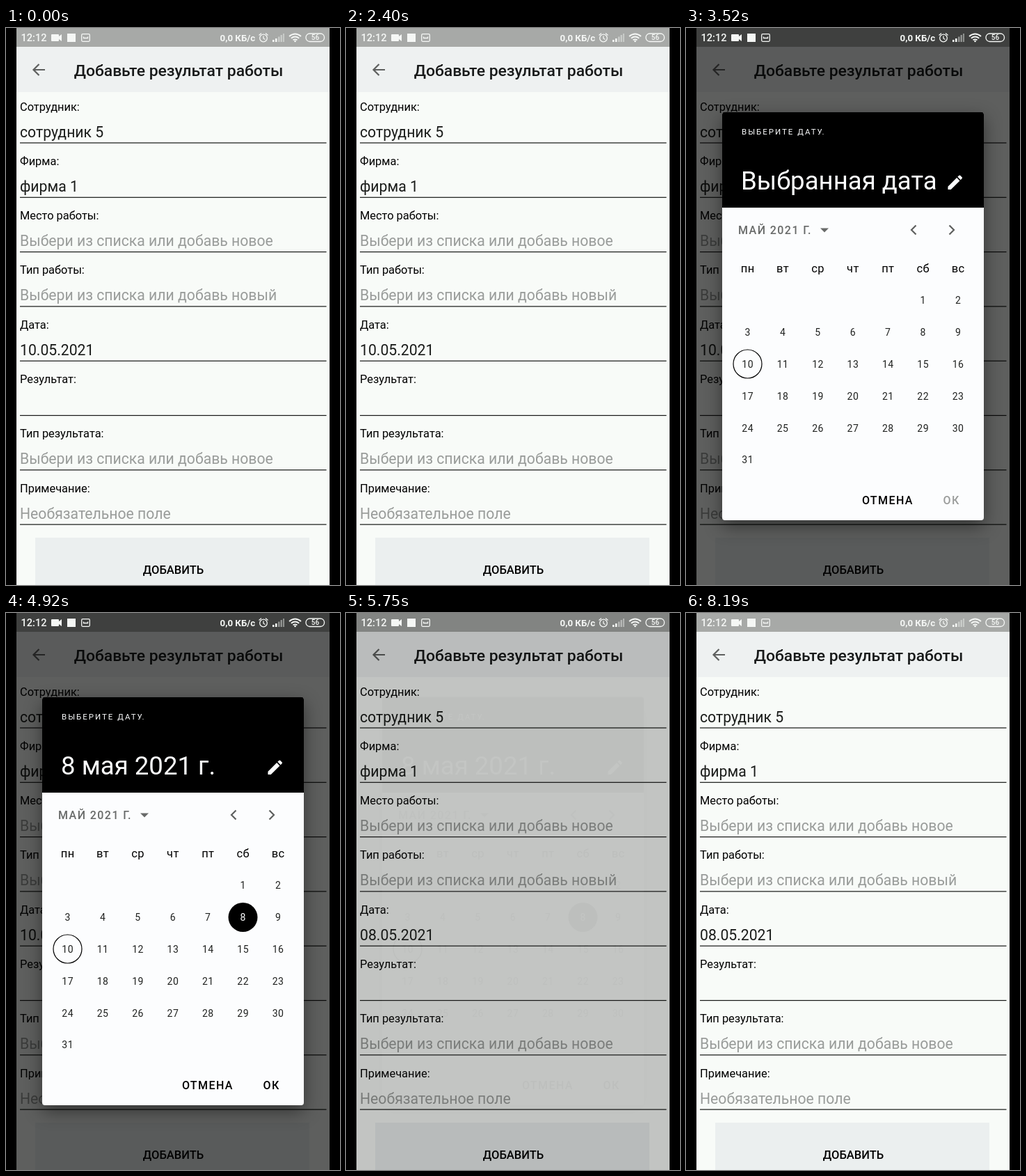
These frames come from a looping animation (480x800 px, 8.23 s). An HTML page:

```html
<!DOCTYPE html>
<html lang="ru">
<head>
<meta charset="utf-8">
<style>
  html, body { margin: 0; height: 100%; overflow: hidden; background: #000; }
  svg { display: block; width: 480px; height: 800px; font-family: Roboto, sans-serif; }
  .medium { font-weight: 500; }
  .mid { text-anchor: middle; }
  .label { font-size: 16.4px; }
  .value { font-size: 21.2px; fill: #1a1c1a; }
  .hint { fill: #999c9a; }
  .caps { font-size: 16px; font-weight: 500; letter-spacing: 1.43px; }
  .line { fill: none; stroke: #5e605f; stroke-width: 2.2; }
  #shadow { filter: drop-shadow(0 9px 13px rgba(0, 0, 0, .45)); }
</style>
</head>
<body>
<svg viewBox="0 0 480 800">
  <rect width="480" height="800"/>
  <rect x="15" width="450" height="800" fill="#f8fbf8"/>
  <rect x="15" width="450" height="27" fill="#a7a9a7"/>
  <rect x="15" y="27" width="450" height="65" fill="#eef1f1"/>
  <path class="line" d="M56 60H40M47.5 52l-8 8 8 8"/>
  <text class="medium mid" x="248" y="69" font-size="22.9" fill="#181a1a">Добавьте результат работы</text>
  <g id="form"></g>
  <rect x="42" y="732" width="394" height="68" fill="#ebefef"/>
  <text class="medium mid" x="240.5" y="784" font-size="16.5">ДОБАВИТЬ</text>
  <rect id="dim" x="15" width="450" height="800"/>

  <g fill="#f5f7f5">
    <text class="medium" x="21.5" y="18.7" font-size="14.6">12:12</text>
    <path d="M66 9h9q1 0 1 1v2l4-3v10l-4-3v2q0 1-1 1h-9q-1 0-1-1v-8q0-1 1-1z"/>
    <rect x="88" y="8" width="12" height="12"/>
    <g fill="none" stroke="#f5f7f5" stroke-width="1.3">
      <rect x="108.7" y="8.7" width="11.6" height="10.6" rx="1.5"/>
      <path d="M111 14.5h7M111.5 12.5v2M117.5 12.5v2"/>
      <circle cx="370" cy="14.5" r="5.3"/>
      <path d="M370 11.5v3.5l2.5 1.5M363.5 10.5l3.500-3M376.5 10.5l-3.5-3"/>
      <rect x="431" y="8" width="26.5" height="11.5" rx="5.5"/>
      <path stroke-width="1.8" d="M407 12q8.5-7 17 0M409.8 14.8q5.7-4.5 11.4 0M412.5 17.3q3-2 6 0"/>
    </g>
    <path d="M383 17h2.5v3h-2.5zM387 15h2.5v5h-2.5z"/>
    <path opacity=".45" d="M391 12.5h2.5v7.5h-2.5zM394.5 10h2.5v10h-2.5zM398 8h2v12h-2z"/>
    <circle cx="415.5" cy="19" r="1.3"/>
    <text x="307.5" y="18.5" font-size="13.3" font-weight="700">0,0 КБ/с</text>
    <text class="mid medium" x="444.5" y="17.3" font-size="10">56</text>
  </g>

  <g id="dialog">
    <rect id="shadow" x="52" y="120.5" width="376" height="586.5" rx="4" fill="#fcfdfe"/>
    <path d="M52 258V124.5q0-4 4-4H424q4 0 4 4V258z"/>
    <g fill="#fcfdfe">
      <text x="80" y="152.5" font-size="11.46" letter-spacing="2">ВЫБЕРИТЕ ДАТУ.</text>
      <text id="headline" x="79" y="231.5" font-size="36.6"></text>
      <path transform="translate(373 208) scale(1.146)" d="M3 17.25V21h3.75L17.81 9.94l-3.75-3.75zM20.71 7.04q.6-.7 0-1.41l-2.34-2.34q-.7-.6-1.41 0l-1.83 1.83 3.75 3.75z"/>
    </g>
    <text class="caps" x="75" y="296" fill="#686a69">МАЙ 2021 Г.</text>
    <path d="M193 287.5h12l-6 6z" fill="#686a69"/>
    <path class="line" d="M330.5 283.5l-6.5 6.5 6.5 6.5M378.5 283.5l6.5 6.5-6.5 6.5"/>
    <circle cx="88.5" cy="482.5" r="20.5" fill="none" stroke="#000" stroke-width="1.2"/>
    <circle id="mark" cx="340.5" cy="437" r="21"/>
    <g id="days"></g>
    <text class="caps" x="253" y="683.5">ОТМЕНА</text>
    <text class="caps" id="ok" x="369.5" y="683.5">ОК</text>
  </g>
</svg>
<script>
const LOOP = 8230, OPEN = 2600, PICK = 4400, CLOSE = 5622;
const $ = id => document.getElementById(id);
const progress = (t, start, length) => Math.min(1, Math.max(0, (t - start) / length));
const easeOut = p => 1 - (1 - p) ** 2;

const choose = 'Выбери из списка или добавь ';
const fields = [
  ['Сотрудник:', 'сотрудник 5'],
  ['Фирма:', 'фирма 1'],
  ['Место работы:', choose + 'новое', 'hint'],
  ['Тип работы:', choose + 'новый', 'hint'],
  ['Дата:', '10.05.2021'],
  ['Результат:', ''],
  ['Тип результата:', choose + 'новое', 'hint'],
  ['Примечание:', 'Необязательное поле', 'hint']
];
$('form').innerHTML = fields.map(([label, value, kind = ''], i) => {
  const y = 78.3 * i;
  return `<text class="label" x="20" y="${118.5 + y}">${label}</text>
    <text class="value ${kind}" x="20" y="${156.5 + y}">${value}</text>
    <rect x="20" y="${164.4 + y}" width="440.5" height="1.2" fill="#151615"/>`;
}).join('');
const date = document.querySelectorAll('.value')[4];

const cell = (text, col, y, attributes) =>
  `<text class="mid" x="${88.7 + 50.4 * col}" y="${y}" ${attributes}>${text}</text>`;
let days = ['пн', 'вт', 'ср', 'чт', 'пт', 'сб', 'вс']
  .map((name, i) => cell(name, i, 351.3, 'font-size="16.5" letter-spacing=".4"')).join('');
for (let day = 1; day <= 31; day++) {
  const slot = day + 4;
  days += cell(day, slot % 7, 396.3 + 45.8 * Math.floor(slot / 7),
    `id="day${day}" font-size="14" letter-spacing=".5" fill="#202220"`);
}
$('days').innerHTML = days;

function draw(t) {
  const picked = t >= PICK;
  // The backdrop fades evenly, the dialog faster and with easing.
  $('dim').style.opacity = .62 * (progress(t, OPEN, 200) - progress(t, CLOSE, 200));
  $('dialog').style.opacity = easeOut(progress(t, OPEN, 150)) - easeOut(progress(t, CLOSE, 150));
  $('headline').textContent = picked ? '8 мая 2021 г.' : 'Выбранная дата';
  $('mark').style.opacity = picked ? 1 : 0;
  $('day8').style.fill = picked ? '#fcfdfe' : '#202220';
  $('ok').style.fill = picked ? '#000' : '#9a9c9b';
  date.textContent = t < CLOSE ? '10.05.2021' : '08.05.2021';
}

function tick() {
  draw(performance.now() % LOOP);
  requestAnimationFrame(tick);
}
tick();
</script>
</body>
</html>
```
